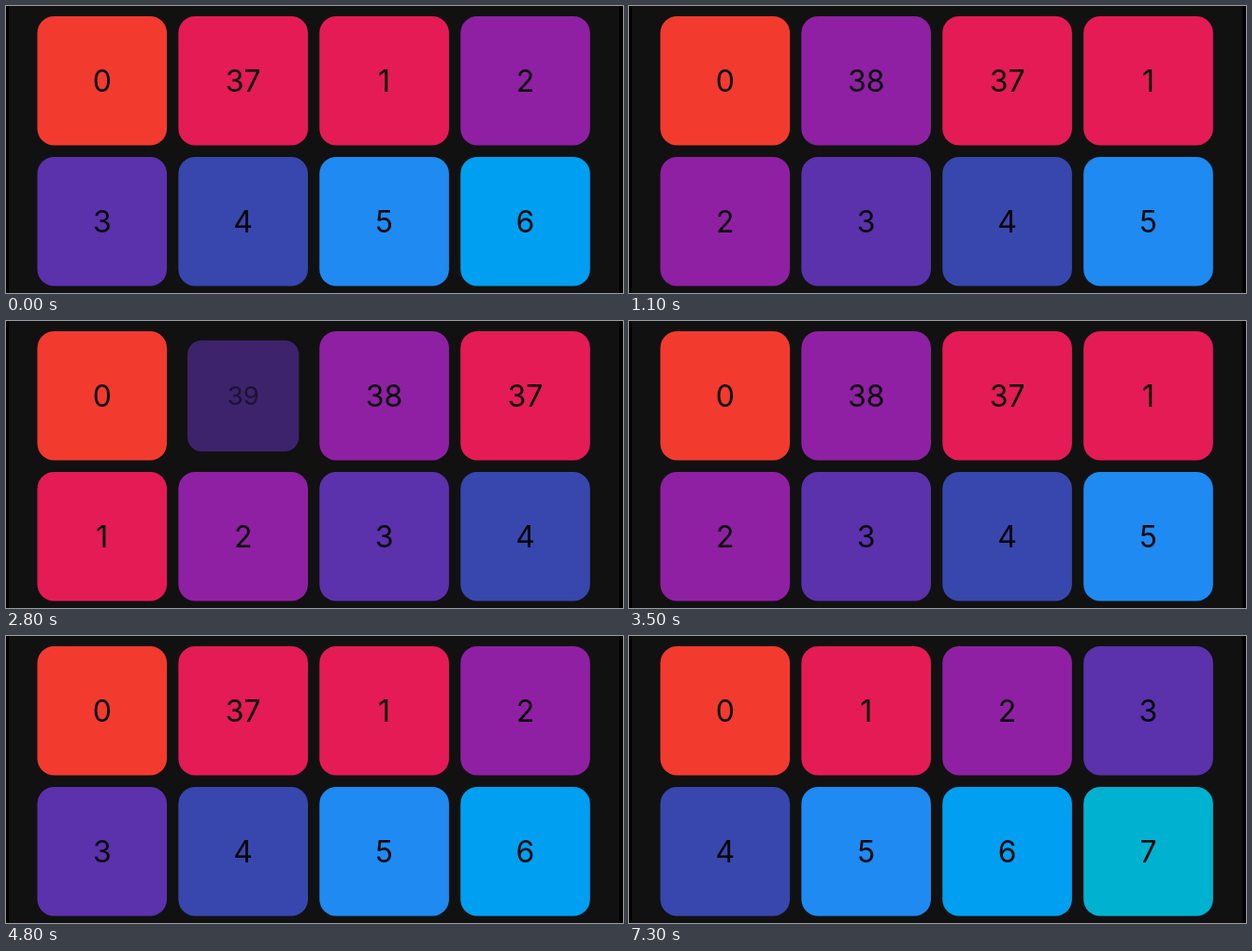
Animation, 660 px wide and 308 px high, one loop 7400 ms. Source, as an HTML page with a canvas:

```html
<!DOCTYPE html>
<html lang="en">
<head>
<meta charset="utf-8">
<title>Tile grid</title>
<style>
html, body { margin: 0; width: 100%; height: 100%; overflow: hidden; background: #111; }
canvas { display: block; width: 660px; height: 308px; }
</style>
</head>
<body>
<canvas id="stage" width="660" height="308"></canvas>
<script>
const ctx = document.getElementById('stage').getContext('2d');
const LOOP = 7400, STEP = 100;
const POP = 600, SLIDE = 300;
const SIZE = 138.6, PITCH = 150.9, LEFT = 33.5, TOP = 11, COLS = 4, RADIUS = 18;
const NUDGE = 38;
const COLORS = ['#f33a2f', '#e51b56', '#8f20a3', '#5b31ac', '#3747ad', '#1e8af2', '#009ff1', '#00b2d0'];
const START = [0, 37, 1, 2, 3, 4, 5, 6, 7];

// New tiles pop in while the others slide; removed tiles pop out first.
const EVENTS = [
  { id: 38, at: 180, add: true },
  { id: 39, at: 1172, add: true },
  { id: 39, at: 2550 },
  { id: 38, at: 3750 },
  { id: 37, at: 4958 }
];

const clamp = v => Math.min(1, Math.max(0, v));
const easeOut = v => 1 - (1 - v) ** 2;

function easeInOutBack(v) {
  const c = 2.5949095;
  if (v < 0.5) return (2 * v) ** 2 * ((c + 1) * 2 * v - c) / 2;
  const w = 2 * v - 2;
  return (w * w * ((c + 1) * w + c) + 2) / 2;
}

const slot = i => ({
  x: LEFT + (i % COLS) * PITCH,
  y: TOP + Math.floor(i / COLS) * PITCH
});

function layout(t) {
  let items = START, before = START, p = 1, event = null;
  for (const e of EVENTS) {
    const begin = e.at + (e.add ? 0 : POP);
    if (t < begin) break;
    before = items;
    items = e.add ? [items[0], e.id, ...items.slice(1)] : items.filter(id => id !== e.id);
    p = easeOut(clamp((t - begin) / SLIDE));
    event = e;
  }
  return { items, before, p, event };
}

function presence(id, t) {
  const e = EVENTS.find(e => e.id === id && t >= e.at && t < e.at + POP);
  if (!e) return 1;
  const v = (t - e.at) / POP;
  return e.add ? v : 1 - v;
}

function drawTile(id, x, y, shown) {
  const scale = easeInOutBack(shown);
  ctx.save();
  ctx.globalAlpha = shown;
  ctx.translate(x + SIZE / 2, y + SIZE / 2);
  ctx.scale(scale, scale);
  ctx.fillStyle = COLORS[id % 36];
  ctx.beginPath();
  ctx.roundRect(-SIZE / 2, -SIZE / 2, SIZE, SIZE, RADIUS);
  ctx.fill();
  ctx.fillStyle = '#080808';
  ctx.fillText(id, 0, 11.3);
  ctx.restore();
}

function draw(t) {
  ctx.fillStyle = '#111';
  ctx.fillRect(0, 0, 660, 308);
  ctx.fillStyle = '#000';
  ctx.fillRect(0, 0, 3, 308);
  ctx.fillRect(656, 0, 4, 308);
  ctx.font = '400 32px Inter, sans-serif';
  ctx.textAlign = 'center';

  const { items, before, p, event } = layout(t);
  items.forEach((id, i) => {
    const to = slot(i);
    const old = before.indexOf(id);
    const from = old < 0 ? to : slot(old);
    // The tile taking a removed tile's place comes in from lower right.
    const shift = event && !event.add && i === 1 ? NUDGE : 0;
    const x = to.x + (from.x + shift - to.x) * (1 - p);
    const y = to.y + (from.y + shift - to.y) * (1 - p);
    const shown = presence(id, t);
    if (shown > 0) drawTile(id, x, y, shown);
  });
}

const origin = performance.now();
function frame() {
  const t = (performance.now() - origin) % LOOP;
  draw(Math.floor(t / STEP) * STEP);
  requestAnimationFrame(frame);
}
frame();
</script>
</body>
</html>
```
